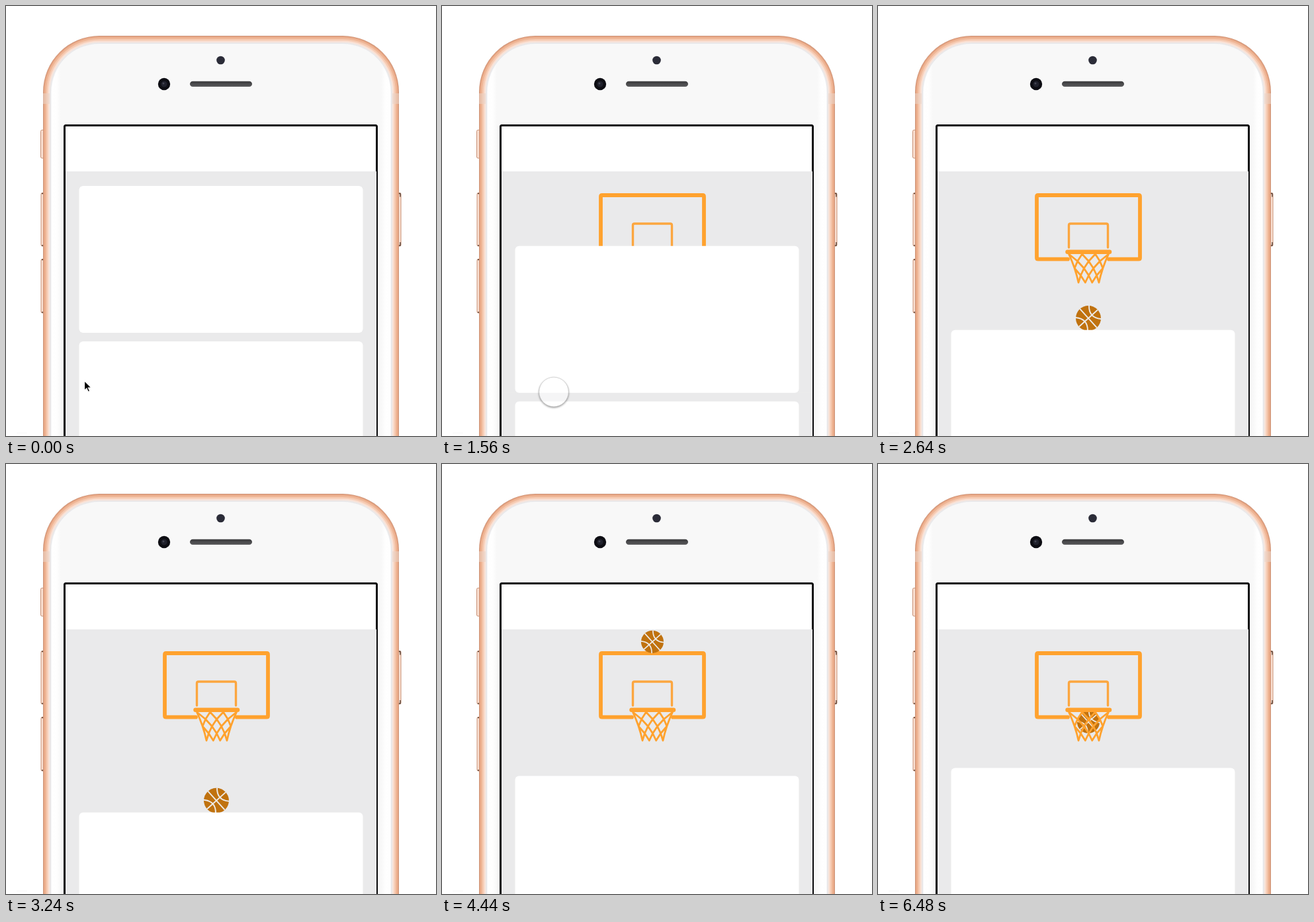
Animation, 650 px wide and 650 px high, one loop 6540 ms. Source, as an HTML page:

```html
<!DOCTYPE html>
<html lang="en">
<head>
<meta charset="utf-8">
<title>Pull to refresh</title>
<style>
html, body { margin: 0; width: 100%; height: 100%; overflow: hidden; background: #fff; }
svg { display: block; width: 650px; height: 650px; }
</style>
</head>
<body>
<svg viewBox="0 0 650 650">
  <defs>
    <linearGradient id="face">
      <stop offset="0" stop-color="#fff"/><stop offset=".015" stop-color="#fefefe"/>
      <stop offset=".027" stop-color="#f8f8f8"/><stop offset=".973" stop-color="#f8f8f8"/>
      <stop offset=".985" stop-color="#fefefe"/><stop offset="1" stop-color="#fff"/>
    </linearGradient>
    <linearGradient id="speaker" x2="0" y2="1">
      <stop stop-color="#3a3a3c"/><stop offset="1" stop-color="#5b5b5d"/>
    </linearGradient>
    <clipPath id="view"><rect x="90" y="250" width="470" height="400"/></clipPath>
    <filter id="shade" x="-30%" y="-30%" width="160%" height="160%"><feGaussianBlur stdDeviation="1.6"/></filter>
    <mask id="ring"><rect x="-40" y="-40" width="80" height="80" fill="#fff"/><circle r="22" fill="#000"/></mask>
  </defs>
  <rect x="16" y="645" width="16" height="1" fill="#f7f7f7"/>
  <g id="buttons"></g>
  <g id="body"></g>
  <path d="M56 132h10v16h-10zM584 132h10v16h-10z" fill="#e9d3c8" opacity=".55"/>

  <circle cx="324.5" cy="82" r="6.3" fill="#2b2c38"/>
  <circle cx="239" cy="118" r="9.2" fill="#0d0d13"/>
  <circle cx="239" cy="118" r="4.6" fill="#20212c"/>
  <circle cx="238" cy="117" r="1.5" fill="#454653"/>
  <rect x="278" y="113.7" width="94" height="8.4" rx="4.2" fill="url(#speaker)"/>

  <rect x="88.5" y="180.5" width="472" height="500" rx="2" fill="#fff" stroke="#08080a" stroke-width="3"/>
  <g clip-path="url(#view)">
    <rect x="90" y="250" width="470" height="400" fill="#eaeaeb"/>
    <g fill="none" stroke="#ffa22e" stroke-linecap="round" stroke-linejoin="round">
      <path d="M287 382.7H242q-2 0-2-2V288q0-2 2-2H394q2 0 2 2V380.700q0 2-2 2H349" stroke-width="5.8"/>
      <path d="M288.500 365V331.500q0-2.500 2.500-2.500H345q2.500 0 2.500 2.500V365" stroke-width="3.4" stroke="#fca63f"/>
    </g>
    <g id="ball" fill="none" stroke="#eeebe7" stroke-width="1.9">
      <circle r="19" fill="#c0720f" stroke="none"/>
      <path d="M-19 0H19M0-19V19M-13.500-13.500Q-1 0-13.500 13.500M13.500-13.500Q1 0 13.500 13.500" transform="rotate(-42)"/>
    </g>
    <g fill="none" stroke="#ffa22e" stroke-linecap="round" stroke-linejoin="round">
      <path id="net" stroke-width="2.8"/>
      <path d="M286.500 371.700H350" stroke-width="6.500"/>
    </g>
    <g id="cards" fill="#fff">
      <rect x="90" y="494" width="470" height="400" fill="#eaeaeb"/>
      <rect x="110.500" y="272" width="429" height="222" rx="6"/>
      <rect x="110.500" y="507" width="429" height="222" rx="6"/>
    </g>
  </g>
  <g id="touch">
    <circle cy="1.300" r="22.500" fill="#000" opacity=".42" filter="url(#shade)" mask="url(#ring)"/>
    <circle r="22.300" fill="#fff" fill-opacity=".55" stroke="#bbb" stroke-width=".5"/>
  </g>
  <path id="cursor" d="M0 0V14.500L3.400 11.400 5.700 16.800 8.200 15.700 5.900 10.500H10.600Z" fill="#000" stroke="#fff" stroke-width="1.200"/>
</svg>
<script>
const $ = id => document.getElementById(id);
const LOOP = 6540, STEP = 60;

// Shell: nested rounded outlines, from the copper rim to the glass
const layers = [
  [0, '#cf967a'], [1, '#e6a482'], [2.5, '#efb696'], [5, '#f6cbb3'],
  [7.5, '#fae0d3'], [9.5, '#f0e8e5'], [11, '#e6e6e8'], [12, '#f7f7f8'], [13, 'url(#face)']
];
$('body').innerHTML = layers.map(([d, fill]) =>
  `<rect x="${56 + d}" y="${45 + d}" width="${538 - 2 * d}" height="800" rx="${85 - d}" fill="${fill}"/>`).join('');

const button = (x, top, bottom, ends) =>
  `<rect x="${x}" y="${top}" width="6" height="${bottom - top}" rx="2" fill="#fae0d2" stroke="#c89074"/>` +
  (ends ? `<path d="M${x + 1} ${top + 1}h4v5M${x + 1} ${bottom - 1}h4v-5" fill="none" stroke="#5d4437" stroke-width="1.500"/>` : '');
$('buttons').innerHTML = button(52.5, 187.5, 230) + button(53, 282.5, 363, 1) +
  button(53, 382.5, 464, 1) + button(591, 282.5, 363, 1);

// Net: mirrored zigzag strands that narrow towards the bottom
const rows = 4;
const netPoint = (u, row) => {
  const v = row / rows, half = 30 - 20 * v + 5.5 * v * v;
  return `${318.5 + (2 * u - 1) * half} ${375 + 43 * v}`;
};
const strand = at => 'M' + Array.from({ length: rows + 1 }, (_, r) => netPoint(at(r), r)).join('L');
let net = strand(() => 0) + strand(() => 1);
for (let j = 0; j < 6; j++) net += strand(r => (j + ((j + r) % 2 ? 1 : 0)) / 6);
$('net').setAttribute('d', net);

const clamp = x => Math.min(1, Math.max(0, x));
const phase = (t, from, to) => clamp((t - from) / (to - from));
const mix = (a, b, p) => a + (b - a) * p;
const smooth = p => p * p * (3 - 2 * p);
const place = (id, x, y, scale = 1) =>
  $(id).setAttribute('transform', `translate(${x} ${y}) scale(${scale})`);
const show = (id, on) => $(id).setAttribute('visibility', on ? 'visible' : 'hidden');

const PULL = 1030, THROW = 3900, RELEASE = 4020, DROP = 4200, LAND = 4620;

const pullAt = t => t < RELEASE
  ? 268 * (1 - (1 - phase(t, PULL, 3870)) ** 2)
  : 187.5 + 80.5 * Math.exp(-(t - RELEASE) / 220);

function ballAt(t, top) {
  if (t < THROW) return Math.max(472, top - 18);
  if (t < DROP) return mix(522, 210, phase(t, THROW, RELEASE));
  return mix(210, 390, phase(t, DROP, LAND) ** 2);
}

function draw(t) {
  const pull = pullAt(t);
  place('cards', 0, pull);
  place('ball', 318, ballAt(t, 272 + pull), t < DROP ? 1 : 0.9);

  const p = smooth(phase(t, 120, 840));
  place('cursor', mix(118.5, 164, p), mix(566.5, 402, p));
  show('cursor', t < 900);
  place('touch', 164 + pull * 0.055, 402 + pull * 2);
  show('touch', t >= 900 && t < RELEASE);
}

const start = performance.now();
function frame() {
  const t = (performance.now() - start) % LOOP;
  draw(Math.floor(t / STEP) * STEP);
  requestAnimationFrame(frame);
}
frame();
</script>
</body>
</html>
```
